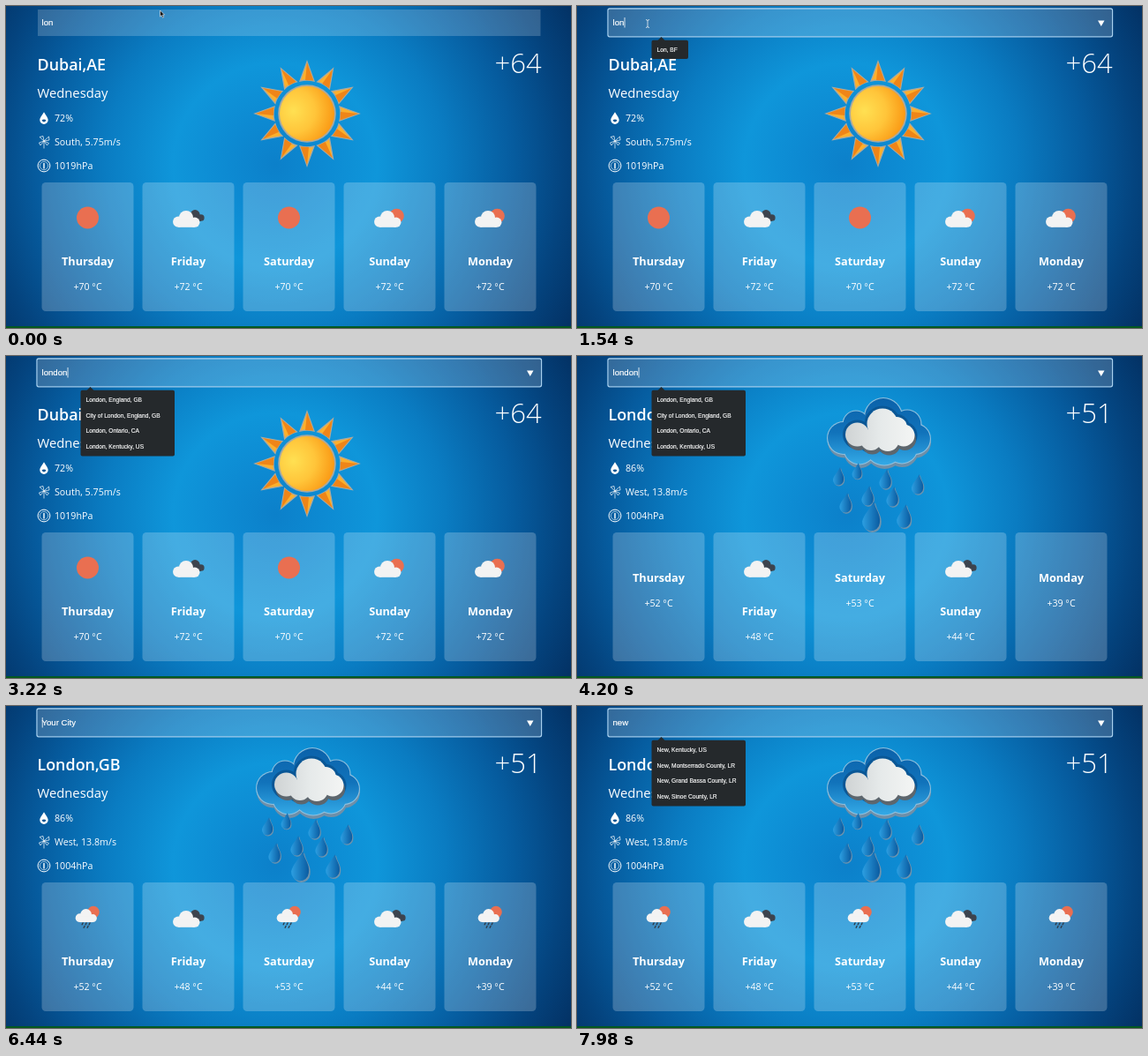
An HTML page that plays this animation: 640x365 px, repeating every 8000 ms.

```html
<!DOCTYPE html>
<html lang="en">
<head>
<meta charset="utf-8">
<title>Weather</title>
<style>
html, body { margin: 0; width: 100%; height: 100%; overflow: hidden; background: #04407a; }
svg { display: block; width: 100%; height: 100%; }
text { fill: #fff; font-family: "Open Sans", "Noto Sans", sans-serif; font-weight: 400; white-space: pre; }
.city { font-size: 17.9px; font-weight: 600; }
.today { font-size: 14.8px; }
.stat { font-size: 10.7px; }
.now { font-size: 31px; font-weight: 300; }
.day { font-size: 12.7px; font-weight: 700; text-anchor: middle; }
.deg { font-size: 10.6px; text-anchor: middle; }
.field { font: 9.6px "Liberation Sans", Arial, sans-serif; stroke: #fff; stroke-width: .2; }
.item { font: 6.65px "Liberation Sans", Arial, sans-serif; stroke: #fff; stroke-width: .15; }
</style>
</head>
<body>
<svg id="stage" viewBox="0 0 640 365" preserveAspectRatio="none">
  <defs>
    <radialGradient id="sky" gradientUnits="userSpaceOnUse" cx="305" cy="180" r="385">
      <stop offset="0" stop-color="#0c80ca"/><stop offset=".14" stop-color="#0d8ad2"/>
      <stop offset=".3" stop-color="#0f96da"/><stop offset=".5" stop-color="#0a7cc2"/>
      <stop offset=".7" stop-color="#065c9f"/><stop offset=".85" stop-color="#04447f"/>
      <stop offset="1" stop-color="#033062"/>
    </radialGradient>
    <radialGradient id="disc" cx=".25" cy=".45" r=".8">
      <stop offset="0" stop-color="#ffe052"/><stop offset=".5" stop-color="#ffc53a"/>
      <stop offset="1" stop-color="#f9930f"/>
    </radialGradient>
    <linearGradient id="storm" gradientUnits="userSpaceOnUse" x1="0" y1="48" x2="0" y2="126">
      <stop offset="0" stop-color="#0b62aa"/><stop offset=".5" stop-color="#1173bb"/>
      <stop offset="1" stop-color="#36aeea"/>
    </linearGradient>
    <linearGradient id="puff" gradientUnits="userSpaceOnUse" x1="304" y1="0" x2="384" y2="0">
      <stop offset="0" stop-color="#cfd3d4"/><stop offset=".5" stop-color="#e6eaea"/>
      <stop offset="1" stop-color="#f4f5f4"/>
    </linearGradient>
    <linearGradient id="water" x1="0" x2="1">
      <stop offset="0" stop-color="#2c9fe2"/><stop offset="1" stop-color="#0a5ba0"/>
    </linearGradient>
  </defs>
  <rect width="640" height="365" fill="url(#sky)"/>
  <rect y="363" width="640" height="2" fill="#04581f"/>
  <g fill="none" stroke="#fff">
    <path d="M43 120.3C45 124 47.700 126.500 47.700 129.300A4.700 4.700 0 0 1 38.300 129.300C38.300 126.500 41 124 43 120.300Z" fill="#fff" stroke="none"/>
    <path d="M40.500 129.500q2.500-2 5 0q-2.500 4-5 0" fill="#0a5593" stroke="none"/>
    <path d="M43 153V161.500M43 153L38 148.500L42 147.500ZM43 153L48.500 148L49 152ZM43 153L37.500 155L39 158ZM43 153L46.500 158L48.500 155.500Z" stroke-width=".7"/>
    <circle cx="43" cy="181" r="6.9"/><circle cx="43" cy="181" r="4.7" stroke-width=".6"/>
    <path d="M43 178V184.500" stroke-width="1.4"/>
  </g>
  <g id="view"></g>
</svg>
<script>
const LOOP = 8000;
const DAYS = ["Thursday", "Friday", "Saturday", "Sunday", "Monday"];
const dubai = {
  city: "Dubai,AE", now: "+64", stats: ["72%", "South, 5.75m/s", "1019hPa"],
  icons: ["sun", "clouds", "sun", "partly", "partly"], temps: [70, 72, 70, 72, 72]
};
const london = {
  city: "London,GB", now: "+51", stats: ["86%", "West, 13.8m/s", "1004hPa"],
  icons: ["rain", "clouds", "rain", "clouds", "rain"], temps: [52, 48, 53, 44, 39]
};

// [start time, value] steps
const typed = [[0, "lon"], [1820, "lond"], [2100, "londo"], [2380, "london"],
  [5460, "londo"], [5600, "lond"], [5740, "lon"], [5950, "lo"], [6090, "l"], [6230, ""],
  [6930, "n"], [7140, "ne"], [7350, "new"]];
const lond = ["Lond, Madhya Pradesh, IN"];
const hints = [[0, []], [1330, ["Lon, BF"]], [2170, lond],
  [2730, ["London, England, GB", "City of London, England, GB", "London, Ontario, CA", "London, Kentucky, US"]],
  [4830, []], [5740, lond], [6020, []],
  [7630, ["New, Kentucky, US", "New, Montserrado County, LR", "New, Grand Bassa County, LR", "New, Sinoe County, LR"]]];
const FOCUS = 1050, UPDATE = 3990, LOADED = 4410;

const at = (steps, t) => steps.filter(s => s[0] <= t).pop()[1];
const text = (cls, x, y, s) => `<text class="${cls}" x="${x}" y="${y}">${s}</text>`;
const circle = (x, y, r, fill) => `<circle cx="${x}" cy="${y}" r="${r}" fill="${fill}"/>`;
const move = (x, y, s, k = 1) => `<g transform="translate(${x} ${y}) scale(${k})">${s}</g>`;
const lobes = (list, fill, grow = 0, dx = 0, dy = 0) =>
  list.map(([x, y, r]) => circle(x + dx, y + dy, r + grow, fill)).join("");

// Forecast icons, centred on 0,0
const smallCloud = fill => lobes([[-9, 4.5, 6], [-.5, 0, 7.8], [9, 5, 5.5]], fill) +
  `<rect x="-9" y="2" width="18" height="8.5" fill="${fill}"/>`;
const white = smallCloud("#f3f3f3");
const front = move(-2, 0, white, 1.03);
const icon = {
  sun: circle(0, 0, 12.5, "#e96f51"),
  clouds: move(8, -3.5, smallCloud("#3d444e"), .7) + front,
  partly: circle(8, -2, 8.3, "#e96f51") + front,
  rain: circle(6.5, -6.5, 6.8, "#e96f51") + move(-1.5, -3.5, white, .82) +
    [[-6, 7], [-2, 7], [2, 7], [-4, 10.5], [0, 10.5]].map(([x, y]) =>
      `<path d="M${x + .5} ${y - 1}l-.8 1.800" stroke="#303b48" stroke-width="1.400" stroke-linecap="round"/>`).join("")
};

function bigSun() {
  let rays = "";
  for (let a = 0; a < 360; a += 30)
    rays += `<g transform="rotate(${a})"><path d="M0-59L-8-37Q0-39 8-37Z" fill="#fcb02c" stroke="#a8a9a2" stroke-width="1.300"/>
      <path d="M0-58L7.300-37.500L-2-38Z" fill="#ef8518"/></g>`;
  return move(341, 122, rays + circle(0, 0, 32.8, "#a8a9a2") + circle(0, 0, 31, "url(#disc)"));
}

function bigRain() {
  const outer = [[302, 93, 18.5], [316, 77, 15], [347, 69, 21.5], [374, 77, 16], [383, 94, 17.5],
    [320, 105, 18], [348, 102, 22], [368, 104, 18]];
  const inner = [[317.5, 89, 13.5], [346, 77, 17.5], [362, 81, 12], [370, 90, 12.5],
    [333, 95, 12], [352, 95, 13]];
  const drop = "M2-10C3-4 7-1 6 5A6 6 0 0 1-6 4C-5-1-1-4 2-10Z";
  const drops = [[296, 136, 1], [317, 130, .9], [349, 139, 1.1], [385.5, 145, 1.1], [329, 158, 1.1],
    [357, 159, 1.1], [304, 166, 1.1], [333, 181, 1.65], [370, 181, 1.3]];
  return lobes(outer, "#6f8fa8", 0, .5, 4) + lobes(outer, "#8fc0de", .5) + lobes(outer, "url(#storm)", -.6) +
    lobes(inner, "#0a5796", 3) + lobes(inner, "#5d666d", 0, 1.5, 4.5) + lobes(inner, "url(#puff)") +
    drops.map(([x, y, k]) => move(x, y,
      `<path d="${drop}" transform="translate(1 1)" fill="#6f93ad"/><path d="${drop}" fill="url(#water)"/>`, k)).join("");
}
const hero = { sun: bigSun(), rain: bigRain() };

function cards(w, ready) {
  return DAYS.map((day, i) => {
    const shown = ready || w.icons[i] !== "rain", up = shown ? 0 : 37.5;
    return move(40.5 + i * 114, 200,
      `<rect width="104" height="146" rx="4.500" fill="#fff" fill-opacity=".22"/>` +
      (shown ? move(52, 40, icon[w.icons[i]]) : "") +
      text("day", 52, 93.5 - up, day) + text("deg", 52, 121.5 - up, `+${w.temps[i]} °C`));
  }).join("");
}

function field(value, focused, caret) {
  const edge = focused
    ? `<rect x="35" y="3" width="571.500" height="31.800" rx="2" fill="none" stroke="#a9d0ee" stroke-width="1.300"/>
       <path d="M590 16.500h7.500l-3.750 6.500z" fill="#fff"/>` : "";
  // Advance widths in em: l is narrow, w wider than the rest
  const em = [...value].reduce((n, c) => n + ({ l: .222, w: .722 }[c] || .556), 0);
  return `<rect x="36" y="4" width="569.500" height="30" fill="#fff" fill-opacity=".19"/>` + edge +
    text("field", 40.5, 22.3, value || "Your City") +
    (focused && caret ? `<rect x="${40.8 + em * 9.6}" y="13" width=".8" height="11.500" fill="#fff"/>` : "");
}

function menu(list) {
  if (!list.length) return "";
  const w = list.length > 1 ? 106.5 : list[0].length > 10 ? 101 : 41.5;
  return `<path d="M91 39.500l4.500-4.500l4.500 4.500z" fill="#25292c"/>
    <rect x="84.500" y="38.800" width="${w}" height="${21.2 + (list.length - 1) * 17.8}" rx="2" fill="#25292c"/>` +
    list.map((s, i) => text("item", 90.5, 51.8 + i * 17.8, s)).join("");
}

function pointer(t) {
  if (t >= 1820) return "";
  const p = Math.min(1, Math.max(0, (t - 70) / 840)), e = p * p * (3 - 2 * p);
  const shape = p < .3
    ? `<path d="M0 0V7L1.700 5.500L3 8.200L4.200 7.600L3 5H5Z" fill="#111" stroke="#fff" stroke-width=".6"/>`
    : `<path d="M-2-4.500Q0-4.500 0-3V3Q0 4.500-2 4.500M2-4.500Q0-4.500 0-3M0 3Q0 4.500 2 4.500" fill="none" stroke="#d8e2ea" stroke-width=".9"/>`;
  return move(174.5 - 94.5 * e, 5 + 15 * e, shape);
}

function scene(t) {
  const w = t < UPDATE ? dubai : london;
  const caret = (t + 850) % 1000 < 560;
  return text("city", 35.5, 73, w.city) + text("today", 35.5, 104, "Wednesday") +
    w.stats.map((s, i) => text("stat", 55, 131 + i * 27, s)).join("") +
    text("now", 553.5, 76, w.now) + hero[w === dubai ? "sun" : "rain"] +
    cards(w, t >= LOADED) + field(at(typed, t), t >= FOCUS, caret) +
    menu(at(hints, t)) + pointer(t);
}

const view = document.getElementById("view");
const start = performance.now();
let last;
function frame() {
  const t = Math.max(0, performance.now() - start) % LOOP;
  const next = scene(t);
  if (next !== last) view.innerHTML = last = next;
  requestAnimationFrame(frame);
}
frame();
</script>
</body>
</html>
```
